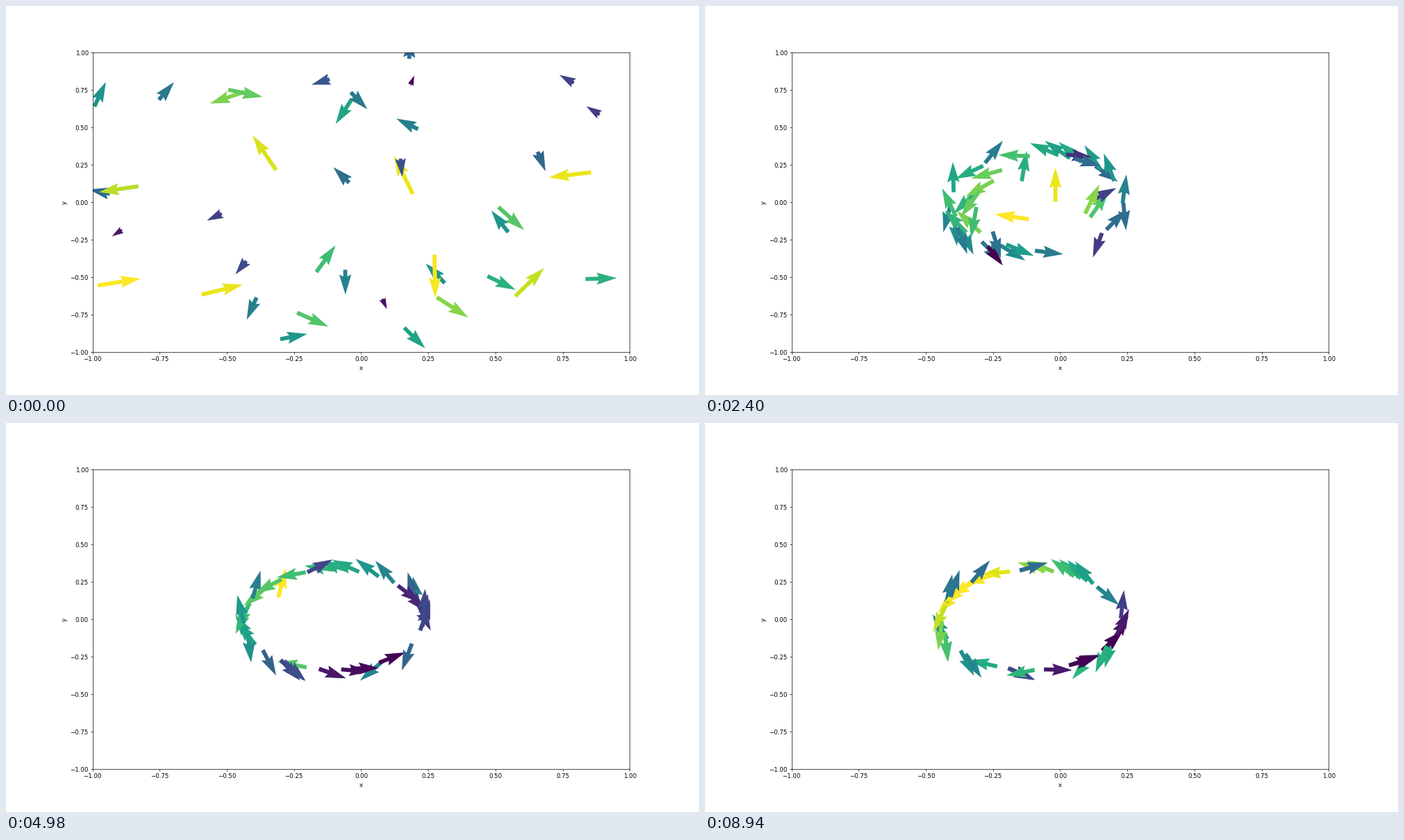
Write a matplotlib script that moves like this. It is 998 px wide and 561 px high and loops after 9000 ms.

```python
import numpy as np
import matplotlib.pyplot as plt
from matplotlib.animation import FuncAnimation

W, H, DPI = 998, 561, 62.375
FRAMES, INTERVAL = 150, 60
COUNT, SEED = 40, 7
DT = 0.1                        # time step
PULL = 9.0                      # attraction to the centre of mass
DRIVE = 2.0                     # self-propulsion towards unit speed
UNIT = 41.5                     # arrow pixels per unit of speed
RING = np.array([-0.116, 0.0])  # where the swarm settles


def simulate():
    """Agents pulled to their common centre settle into a two-way ring."""
    rng = np.random.default_rng(SEED)
    pos = rng.uniform(-0.95, 0.95, (COUNT, 2))
    heading = rng.uniform(0, 2 * np.pi, COUNT)
    speed = rng.uniform(0.33, 1.53, COUNT)
    vel = np.column_stack([speed * np.cos(heading), speed * np.sin(heading)])
    path = []
    for _ in range(FRAMES):
        path.append((pos, vel))
        speed2 = (vel ** 2).sum(axis=1, keepdims=True)
        force = DRIVE * (1 - speed2) * vel - PULL * (pos - pos.mean(axis=0))
        vel = vel + DT * force
        pos = pos + DT * vel
    shift = RING - pos.mean(axis=0)
    return [(p + shift, v) for p, v in path]


states = simulate()
fig, ax = plt.subplots(figsize=((W + 1e-6) / DPI, (H + 1e-6) / DPI), dpi=DPI)
ax.set(xlim=(-1, 1), ylim=(-1, 1), xlabel="x", ylabel="y")
pos, vel = states[0]
quiver = ax.quiver(*pos.T, *vel.T, np.hypot(*vel.T), cmap="viridis",
                   width=0.0075, scale=0.775 * W / UNIT)


def update(i):
    pos, vel = states[i]
    speed = np.hypot(*vel.T)
    quiver.set_offsets(pos)
    quiver.set_UVC(*vel.T, speed)
    quiver.set_clim(speed.min(), speed.max())
    return quiver,


anim = FuncAnimation(fig, update, frames=FRAMES, interval=INTERVAL,
                     repeat=True, repeat_delay=0)
plt.show()
```
